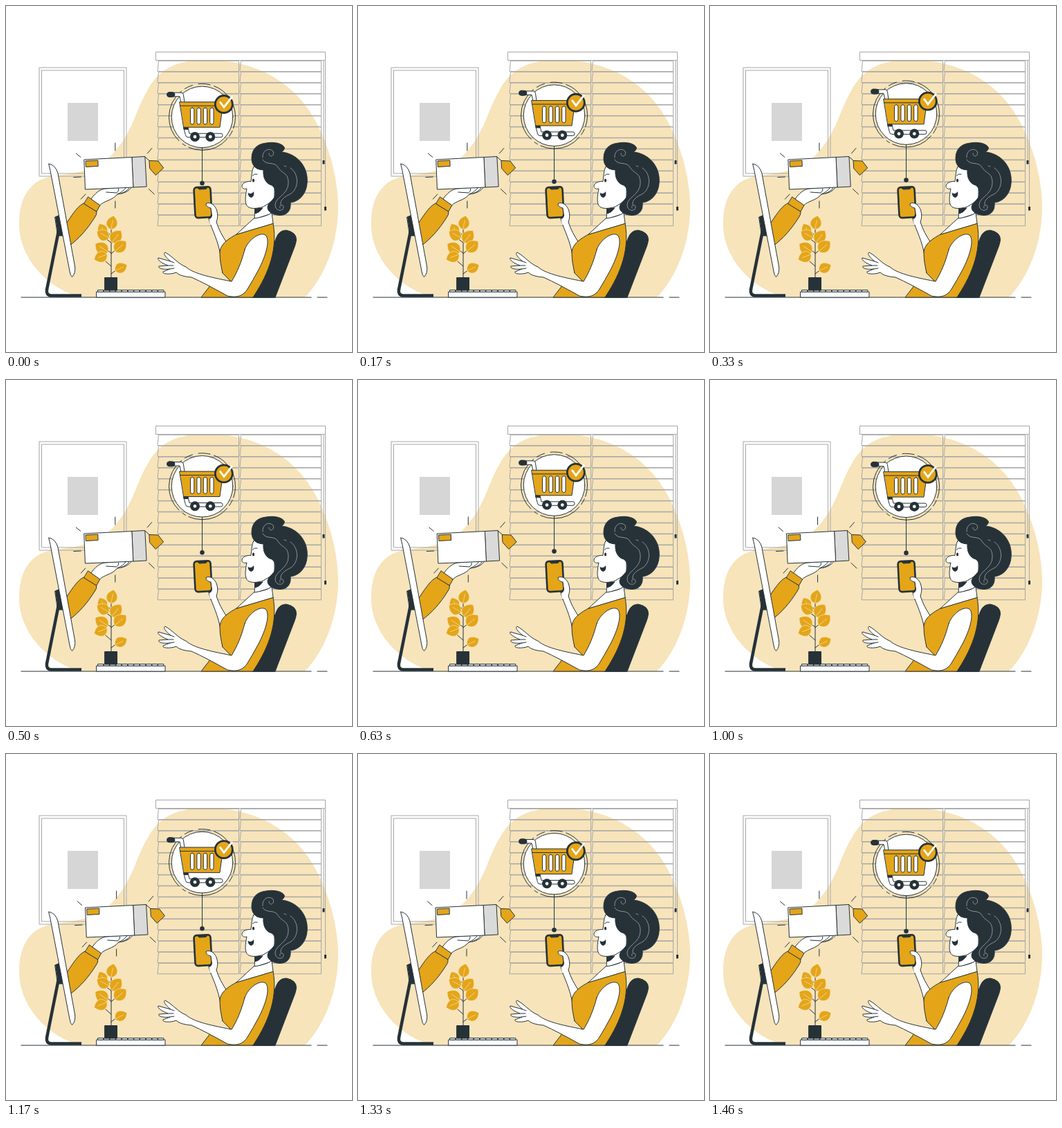
An HTML page that plays this animation: 500 px wide and 500 px high, repeating every 1500 ms.

```html
<!DOCTYPE html>
<html lang="en">
<head>
<meta charset="utf-8">
<title>Online shopping</title>
<style>
  html, body { margin: 0; height: 100%; overflow: hidden; background: #fff; }
  svg { display: block; width: 100%; height: 100%; }
  .ink { stroke: #263238; stroke-linecap: round; stroke-linejoin: round; }
  .thin { fill: none; stroke: #a6a6a6; }
  .white { fill: #fff; }
  .gold { fill: #e4a519; }
  .dark { fill: #263238; }
  .none { fill: none; }
  .flat { stroke: none; }
</style>
</head>
<body>
<svg viewBox="0 0 500 500">
  <defs>
    <g id="leaf" stroke="#f7e4ba" stroke-width=".6">
      <path class="gold" d="M0 10C-11 6-10-4 1-10C11-3 10 7 0 10Z"/>
      <path class="none" d="M0 10L1-4"/>
    </g>
  </defs>

  <path fill="#f7e4ba" d="M19 315C19 272 38 249 72 245C108 241 134 235 154 214C184 182 186 152 206 119C222 90 248 78 290 78C370 78 425 118 452 175C470 212 480 255 480 290C480 340 462 390 432 421H110C66 412 19 368 19 315Z"/>

  <g class="thin">
    <path d="M48 89H174V246H48ZM51.5 93H170.5V242H51.5Z"/>
    <path fill="#d6d6d6" stroke="none" d="M89 140H133V195H89Z"/>
    <path id="slats"/>
    <path d="M459 79V224M461.5 79V291"/>
    <path class="white" d="M216.5 66.5H461.5V78.5H216.5Z"/>
  </g>
  <path class="dark" d="M457.500 223h3v5.500h-3zM460 290h3v5.500h-3z"/>

  <path class="ink none" stroke-width="1.2" d="M22 421H441M450 421H464"/>

  <g class="ink">
    <g id="delivery">
      <path class="gold" d="M85 318C94 304 104 288 113 285L131 297Q132 301 128 306C118 322 106 336 91 347Z"/>
      <path class="white" d="M123 279C129 270 136 265 143 264L182 261C178 268 170 271 161 272C153 282 141 281 135 289Z"/>
      <path class="none" d="M145 269L160 270Q164 267 163 264M161 272Q170 268 173 263M166 271Q175 268 178 263"/>
      <path class="gold" d="M119 276L136 288L131 297L113 286Z"/>
      <path class="white" d="M113.3 222L182.5 218.5L184.5 262L115 265Z"/>
      <path fill="#dadada" d="M182.5 218.5L201 217.5L203.3 261L184.5 262Z"/>
      <path class="gold" d="M115.5 224L133 223L133.3 231.5L116 232.5Z"/>
      <path class="none" d="M201 218L209 225"/>
      <path class="gold" d="M207.5 223.5L220 224L227.8 234L216.5 244.5L208 235Z"/>
      <path class="none" d="M158 198V209M158 282V292M101.500 213L108 218.500M98 247.500L108.500 247M108.500 279L115 272M204.500 213L211 205.500M206.500 264.500L214.500 272"/>
    </g>

    <path class="dark" d="M71 305L78 302L84 332H75Z"/>
    <path class="none" stroke-width="4.500" stroke-linecap="butt" d="M76 325L59 410Q58 418 65 418.500H109"/>
    <path class="white" d="M62 228Q72 230 75 242L99.500 376Q101 386 95.500 391.500Q93 390 92 383L64 238Z"/>

    <path class="white" d="M131 413H230V421H131Z"/>
    <path id="keys" class="white"/>
    <path class="dark" d="M143 392.500H160.500V411H143Z"/>
    <path class="none" d="M152 392V320M152 331L145 327M152 342L144 336M152 341L158 337M152 358L160 351M152 357L145 352M152 376L144 369M152 387L160 381"/>
  </g>
  <g id="leaves"></g>

  <g class="ink">
    <path class="dark" d="M356 421L391 334Q395 324 405 324Q420 327 419.500 338Q419 343 417 348L389 421Z"/>

    <rect class="gold" x="-12" y="-22" width="24" height="44" rx="4" stroke-width="2.600" transform="translate(284.500 283.700) rotate(-3)"/>
    <path class="dark" d="M277 262.500L291 262L289 264.500L279.500 265Z"/>
    <path class="white" d="M293 307C295 318 304 332 309 355L313 386L330 372L321 345Q308 326 304 312L303 306Z"/>
    <path class="white flat" d="M293.500 308L304 303L304 315L295 316Z"/>
    <path class="white" d="M293 308Q297 307 297.500 303L296 292C291 291 288 288 289.500 285C296 283 302 288 304.500 295C307 304 305 309 304 312"/>

    <path class="gold" d="M333 330C318 338 309 346 309 357C309 368 311 376 313 386L326 399L296 403L282 421H357C374 395 394 358 386 314Z"/>

    <path class="white" d="M360 290L359 308L384 300L381 285Z"/>
    <path class="dark" d="M360 292L371 292Q366 299 360 300Z"/>
    <path class="white" d="M333 330L358 307Q374 305 384 299L386 314Z"/>
    <path class="white" d="M373 232H358C355 238 355 246 354 253.500C347 253 341 256 341 260.500C341 264 345 265 348 264C346 274 344 286 350 290.500C356 294 366 292 372 290L388 280V255Z"/>
    <path class="none" d="M356.500 245Q359 242 363 243"/>
    <ellipse class="dark flat" cx="357.500" cy="252" rx="1.600" ry="2.600"/>
    <path class="dark flat" d="M349.500 270Q355 273 358 268Q359.500 275 354.500 277Q350 276 349.500 270Z"/>
    <path class="dark" d="M363 235C357 232 355 226 355 220C355 206 364 199 376 198C386 196 400 198 402.500 205Q402 209 398 211C418 213 433 228 435 247C437 267 427 282 411 284C412 294 408 302 396 302.500C385 302 378 297 378 291C378 285 385 282 388 276C390 269 389 262 384 259C376 257 371 249 372 237Q367 237 363 235Z"/>
    <g class="none" stroke="#b5babd" stroke-width=".7">
      <path d="M371 219C370 209 380 204 386 210C389 217 380 220 380 213M371 222C376 231 388 224 393 233C399 243 408 240 408 256C408 272 389 277 389 287C389 298 402 297 401 290C400 286 394 288 396 292M411 234C423 242 424 262 412 271C402 276 396 280 397 287M402 231L405 232"/>
    </g>

    <path class="white" d="M345 352C350 338 366 326 375 331C382 338 376 360 365 381Q357 396 349 409C343 419 334 422 320 419Q290 402 268 392C255 391 249 388 246 385C239 388 225 388 227 384L237 380C230 381 219 380 221 376L234 375C226 372 218 367 220 364L238 369C232 364 226 358 230 356C241 362 249 373 260 377C270 386 290 391 326 398C334 385 340 371 345 352Z"/>
    <path class="none" d="M237 380L243 379M234 375L242 375M238 369L243 371"/>
  </g>

  <g id="bubble" class="ink">
    <circle class="none" cx="283.500" cy="160.700" r="48" stroke-linecap="butt" stroke-dasharray="17 3 10 4 62 4 6 6 82 5 13 8 18 5 58 0"/>
    <circle class="white" cx="283.500" cy="160.700" r="44.300"/>
    <path class="none" d="M283.500 205V256"/>
    <circle class="dark flat" cx="283.500" cy="256.300" r="3.300"/>
    <path class="white" d="M243 125.500H254Q256 126 256.500 129L258 140H253L251 131H243Z"/>
    <rect class="dark" x="232.500" y="124.800" width="11.500" height="7" rx="3.500"/>
    <path class="white" d="M257 176H263L265 184.500H311Q313.500 185 313 187.500Q313 190 310 190H263Q260 190 259.500 187Z"/>
    <path class="dark" d="M257 175.500H263V178.500H257.500Z"/>
    <path class="gold" d="M251 139H314L309 175.500H257Z"/>
    <path class="none" d="M252 144.500H313"/>
    <g id="slots" class="white"></g>
    <g class="white" stroke-width="4.600">
      <circle cx="273" cy="189.300" r="4.700"/>
      <circle cx="295.300" cy="189.300" r="4.700"/>
    </g>
    <circle class="gold" cx="314.800" cy="142.300" r="12.500" stroke-width="2.800"/>
    <path class="none" style="stroke:#fff" stroke-width="2.800" stroke-linecap="butt" stroke-linejoin="miter" d="M309 138.500L315 146.500L327 131"/>
  </g>
</svg>
<script>
  const $ = id => document.getElementById(id);
  const repeat = (n, make) => Array.from({ length: n }, (_, i) => make(i)).join('');

  $('slats').setAttribute('d', repeat(15, i => {
    const y = 79.3 + i * 15.93;
    return [220.5, 339.5].map(x => `M${x} ${y}H${x + 116}V${y + 15.4}H${x - 1.5}Z`).join('');
  }));
  $('keys').setAttribute('d', repeat(11, i => `M${133 + i * 8.7} 410.500h7.800v2.500h-7.800z`));
  $('slots').innerHTML = repeat(4, i =>
    `<rect x="${266.5 + i * 9.4}" y="147.300" width="5.300" height="24" rx="2.650"/>`);
  $('leaves').innerHTML = [
    [153, 313, 8, 1], [139, 323, -30, .9], [140, 331, -65, 1], [159, 333, 35, 1.1],
    [165, 347, 45, 1.1], [138, 350, -60, 1.1], [137, 363, -115, 1], [166, 378, 60, .95]
  ].map(([x, y, turn, size]) =>
    `<use href="#leaf" transform="translate(${x} ${y}) rotate(${turn}) scale(${size})"/>`).join('');

  const LOOP = 1500, LEAD = 20;
  const shake = [0, -1, 2, -4, 4, -4, 4, -4, 2, -1, 0];

  function draw(now) {
    const p = ((now + LEAD) % LOOP) / LOOP;
    const i = Math.floor(p * 10);
    const dx = shake[i] + (shake[i + 1] - shake[i]) * (p * 10 - i);
    const dy = 10 * (Math.abs(2 * p - 1) - 1);
    $('delivery').setAttribute('transform', `translate(${dx} 0)`);
    $('bubble').setAttribute('transform', `translate(0 ${dy})`);
    requestAnimationFrame(draw);
  }
  draw(0);
</script>
</body>
</html>
```
